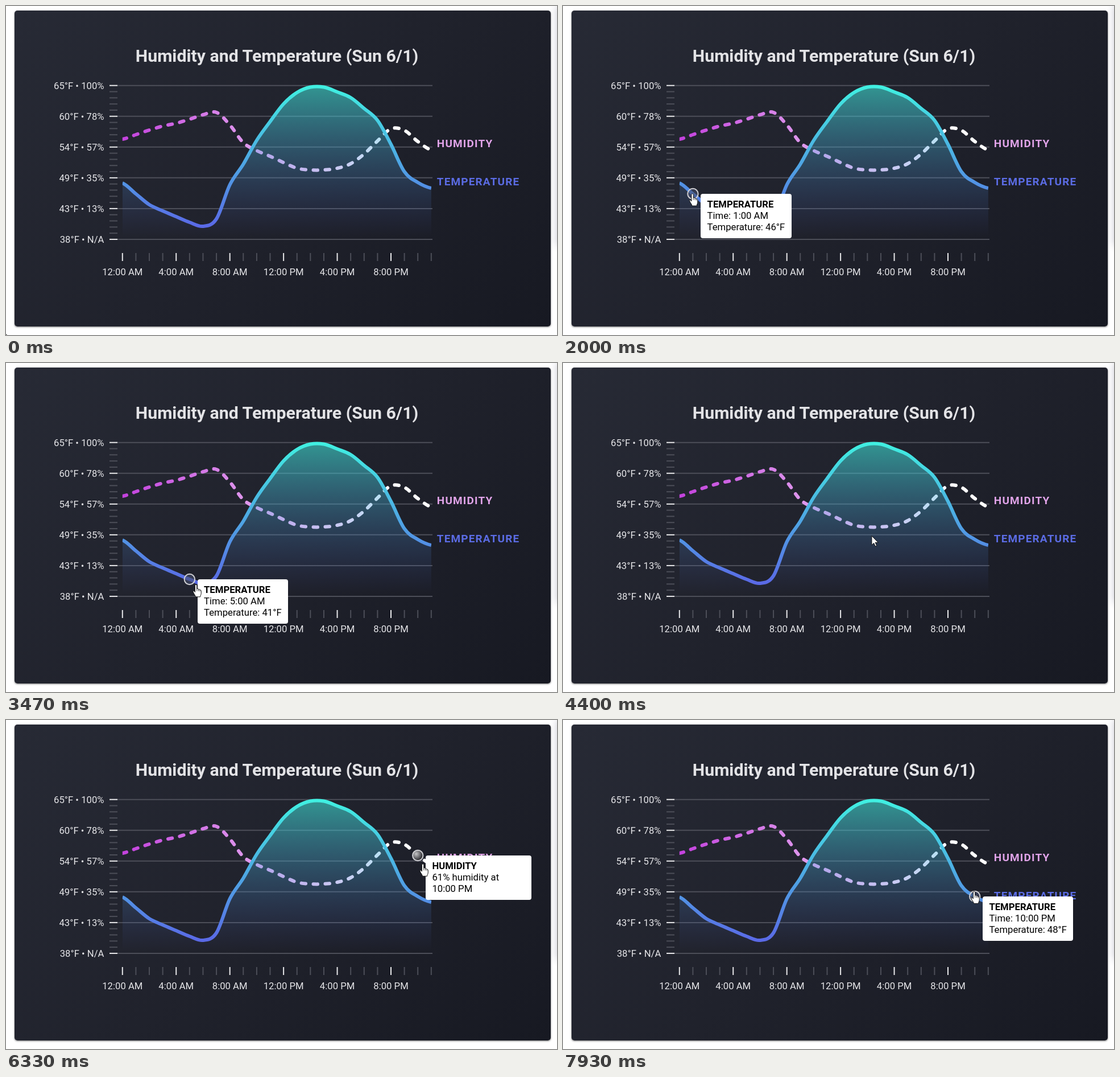
An HTML page for the animation above (8000 ms loop, 969 px wide and 578 px high).

```html
<!DOCTYPE html>
<html lang="en">
<head>
<meta charset="utf-8">
<title>Humidity and Temperature</title>
<style>
  html, body { margin: 0; width: 100%; height: 100%; overflow: hidden; background: #fff; }
  body { position: relative; font: 16.7px/20px Roboto, sans-serif; }
  svg { position: absolute; left: 0; top: 0; }
  #card {
    position: absolute; left: 15px; top: 8px; width: 943px; height: 555px; border-radius: 5px;
    background: linear-gradient(135deg, #272a35, #20222c 50%, #171922);
    box-shadow: 0 1px 3px rgba(0, 0, 0, .55);
  }
  #edge {
    position: absolute; left: 969px; top: 0; width: 20px; height: 420px;
    box-shadow: 0 0 14px rgba(40, 40, 80, .25);
  }
  #area { position: absolute; left: 0; top: 0; width: 923.5px; height: 578px; }
  #tip {
    position: absolute; box-sizing: border-box; padding: 8.6px 11.3px;
    background: #fff; color: #000; border-radius: 4px;
  }
  text { fill: #e6e6e9; }
  .title { font-size: 30.3px; font-weight: 700; fill: #e3e3e6; }
  .series { font-size: 19px; font-weight: 700; letter-spacing: 1.15px; }
</style>
</head>
<body>
<div id="edge"></div>
<div id="card"></div>
<svg width="969" height="578">
  <defs>
    <linearGradient id="tempLine" gradientUnits="userSpaceOnUse" x1="0" y1="140" x2="0" y2="388">
      <stop stop-color="#40f0e1"/><stop offset="1" stop-color="#5a69e6"/>
    </linearGradient>
    <linearGradient id="tempArea" gradientUnits="userSpaceOnUse" x1="0" y1="140" x2="0" y2="405">
      <stop stop-color="#40f0e1" stop-opacity=".56"/><stop offset="1" stop-color="#5a69e6" stop-opacity="0"/>
    </linearGradient>
    <linearGradient id="humLine" gradientUnits="userSpaceOnUse" x1="205" y1="0" x2="690" y2="0">
      <stop stop-color="#c341dd"/><stop offset="1" stop-color="#fff"/>
    </linearGradient>
    <radialGradient id="ball" cx=".35" cy=".35" r=".7">
      <stop stop-color="#c4c4c6"/><stop offset=".55" stop-color="#6a6a6e"/><stop offset="1" stop-color="#18181c"/>
    </radialGradient>
    <clipPath id="plot"><path d="M204.8 120H748V410H204.8Z"/></clipPath>
  </defs>
  <g id="axes"></g>
  <g clip-path="url(#plot)" fill="none" stroke-width="6">
    <path id="hum" stroke="url(#humLine)" stroke-linecap="round" stroke-dasharray="7.5 13.5"/>
    <path id="fill" fill="url(#tempArea)" stroke="none"/>
    <path id="temp" stroke="url(#tempLine)" stroke-linejoin="round"/>
  </g>
  <circle id="marker" r="9.2" stroke="#d0d0d4" stroke-width="2"/>
</svg>
<div id="area"><div id="tip"></div></div>
<svg width="969" height="578">
  <g id="cursor" fill="#fff" stroke="#111" stroke-width="1" stroke-linejoin="round">
    <path id="arrow" d="M0 0V16L3.7 12.6 6.3 18.3 8.7 17.2 6.2 11.6H11.3Z"/>
    <g id="hand">
      <path d="M-1.7 1.7C-1.7-.6 1.7-.6 1.7 1.7V7.5C2.4 6.4 4.5 6.7 4.5 8.3 5.3 7.6 7 8 7 9.4 8 8.9 9.2 9.5 9.2 11V15C9.2 18 7.6 18.5 7.6 21.3H-.6C-.6 19-4.5 15-5 12.2-5.3 10.3-3.2 10.2-1.7 13Z"/>
      <path d="M1.7 7.5V11M4.5 8.3V11.3M7 9.4V11.8" fill="none" stroke-width=".8"/>
    </g>
  </g>
</svg>
<script>
const $ = id => document.getElementById(id);
const LOOP = 8000, LEFT = 204.8, STEP = 23.61, TOP = 139.7, ROW = 54.05;

const temperature = [311, 330, 349, 360, 370, 380, 387, 374, 314, 278, 236, 203,
  172, 152, 142.5, 142.5, 151, 161, 180, 201, 243, 291, 310, 320];
const humidity = [234, 226, 218, 211, 206, 199, 191, 187, 209, 240, 254, 264,
  275, 285, 288, 288, 285, 277, 260, 237, 215.7, 218.5, 238, 253];

const hourX = h => LEFT + STEP * h;
const clock = h => `${h % 12 || 12}:00 ${h < 12 ? 'AM' : 'PM'}`;

// Catmull-Rom spline through one value per hour
function spline(ys) {
  const at = i => ys[Math.max(0, Math.min(ys.length - 1, i))];
  let d = `M${LEFT} ${ys[0]}`;
  for (let i = 0; i < ys.length - 1; i++) {
    const c1 = at(i) + (at(i + 1) - at(i - 1)) / 6;
    const c2 = at(i + 1) - (at(i + 2) - at(i)) / 6;
    d += `C${hourX(i + 1 / 3)} ${c1} ${hourX(i + 2 / 3)} ${c2} ${hourX(i + 1)} ${at(i + 1)}`;
  }
  return d;
}

function drawChart() {
  const line = (x1, y1, x2, y2, color) =>
    `<path d="M${x1} ${y1}L${x2} ${y2}" stroke="${color}" stroke-width="2"/>`;
  const text = (x, y, s, anchor, extra = '') =>
    `<text x="${x}" y="${y}" text-anchor="${anchor}" ${extra}>${s}</text>`;
  const dim = '#4c4e58', bright = '#e8e8ea';
  let out = text(476.5, 98.3, 'Humidity and Temperature (Sun 6/1)', 'middle', 'class="title"');

  const rows = ['65°F • 100%', '60°F • 78%', '54°F • 57%', '49°F • 35%', '43°F • 13%', '38°F • N/A'];
  for (let i = 0; i <= 25; i++) {
    const y = TOP + i * ROW / 5, major = i % 5 === 0;
    if (major) {
      out += line(196, y, 750, y, dim) + text(172.5, y + 5.8, rows[i / 5], 'end');
    }
    out += line(182, y, 196, y, major ? bright : dim);
  }
  for (let h = 0; h < 24; h++) {
    const major = h % 4 === 0;
    out += line(hourX(h), 434, hourX(h), 448, major ? bright : dim);
    if (major) out += text(hourX(h), 473, clock(h), 'middle');
  }
  out += text(757.8, 247.8, 'HUMIDITY', 'start', 'class="series" style="fill:#e0a3e8"');
  out += text(757.8, 314.8, 'TEMPERATURE', 'start', 'class="series" style="fill:#5b6ce4"');
  $('axes').innerHTML = out;

  const curve = spline(temperature);
  $('temp').setAttribute('d', curve);
  $('fill').setAttribute('d', `${curve}V410H${LEFT}Z`);
  $('hum').setAttribute('d', spline(humidity));
}

// Pointer track: time, x, y
const track = [
  [0, 0, 576.5], [69, 0, 576.5], [70, -20, 600], [250, 10, 600], [270, 19, 562], [500, 90, 462],
  [800, 163, 378], [1070, 198, 342], [1200, 217, 331], [1330, 221, 326], [1440, 221, 326],
  [1600, 225, 328], [1960, 225, 328], [2800, 278, 365], [3470, 334, 389.5], [3730, 347, 398],
  [4160, 347, 398], [4270, 430, 356], [4400, 542.5, 304], [4600, 632, 250], [4800, 674, 225],
  [5000, 682, 220.5], [5560, 682, 220.5], [6330, 733, 253], [6400, 737, 254], [6730, 740, 256],
  [7430, 740, 256], [7930, 723, 301], [8000, 723, 301]
];

function pointerAt(t) {
  const i = track.findIndex(k => k[0] > t);
  const [t0, x0, y0] = track[i - 1], [t1, x1, y1] = track[i];
  const p = (t - t0) / (t1 - t0);
  return [x0 + (x1 - x0) * p, y0 + (y1 - y0) * p];
}

function hoveredSeries(t) {
  if (t >= 1200 && t < 4200 || t >= 7800) return temperature;
  if (t >= 4790 && t < 7530) return humidity;
  return null;
}

function tipText(series, h) {
  const y = series[h];
  if (series === temperature) {
    const degrees = Math.round(65 - (y - TOP) / 10);
    return `<b>TEMPERATURE</b><br>Time: ${clock(h)}<br>Temperature: ${degrees}°F`;
  }
  const percent = Math.round(100 - (y - TOP) * 0.4);
  return `<b>HUMIDITY</b><br>${percent}% humidity at ${clock(h)}`;
}

let shown = '';
function render(t) {
  const [x, y] = pointerAt(t), series = hoveredSeries(t);
  $('cursor').setAttribute('transform', `translate(${x} ${y})`);
  $('hand').style.display = series ? '' : 'none';
  $('arrow').style.display = series ? 'none' : '';
  $('marker').style.display = $('tip').style.display = series ? '' : 'none';
  if (!series) return;

  const h = Math.round((x - LEFT) / STEP), html = tipText(series, h);
  if (html === shown) return;
  shown = html;
  const px = hourX(h), py = series[h];
  $('marker').setAttribute('transform', `translate(${px} ${py})`);
  $('marker').setAttribute('fill', series === humidity ? 'url(#ball)' : 'rgba(70,78,110,.6)');
  $('tip').style.left = px + 13.9 + 'px';
  $('tip').style.top = py + 0.4 + 'px';
  $('tip').innerHTML = html;
}

drawChart();
const start = performance.now();
(function tick() {
  render((performance.now() - start) % LOOP);
  requestAnimationFrame(tick);
})();
</script>
</body>
</html>
```
